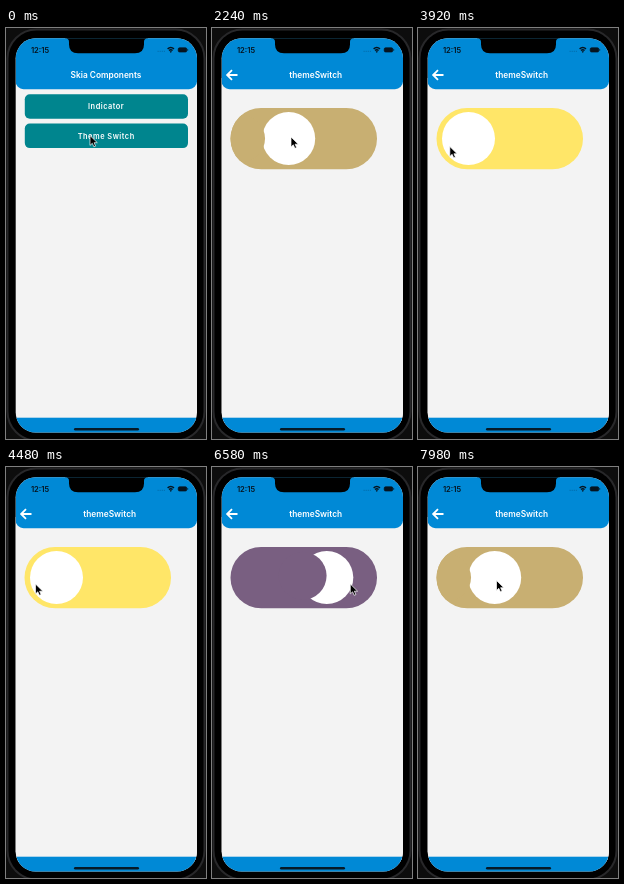
Recreate the animation shown at these times as an HTML page. Size 200 by 411 pixels, loop 8000 ms.

```html
<!DOCTYPE html>
<html lang="en">
<head>
<meta charset="utf-8">
<title>Theme switch</title>
<style>
  html, body { margin: 0; width: 100%; height: 100%; overflow: hidden; background: #0d0d0d; }
  svg { display: block; width: 100vw; height: 100vh; }
  text { font-family: Inter, "Liberation Sans", sans-serif; font-weight: 600; text-anchor: middle; fill: #fff; }
  .title { font-size: 8.35px; }
  .label { font-size: 7.4px; letter-spacing: .5px; }
  .clock { font-size: 7.6px; fill: #06141f; }
  .blue { fill: #0089d6; }
  .paper { fill: #f3f3f3; }
  .button { fill: #00858e; }
</style>
</head>
<body>
<svg viewBox="0 0 200 411">
  <defs>
    <clipPath id="screen"><rect x="9.7" y="10.3" width="181.3" height="394.3" rx="20"/></clipPath>
    <clipPath id="pillShape"><rect x="18.5" y="80" width="146.5" height="61.3" rx="30.6"/></clipPath>
  </defs>

  <rect x="1.5" y="1.5" width="197" height="411" rx="29" fill="#000" stroke="#28282a" stroke-width="2"/>

  <g clip-path="url(#screen)">
    <rect class="paper" width="200" height="411"/>

    <g id="home">
      <rect class="button" x="18.8" y="66.2" width="163.2" height="24.5" rx="5"/>
      <rect class="button" x="18.8" y="95.6" width="163.2" height="24.5" rx="5"/>
      <text class="label" x="100.2" y="81.1">Indicator</text>
      <text class="label" x="100.2" y="110.5">Theme Switch</text>
    </g>

    <g id="detail">
      <rect class="paper" x="9" y="50" width="183" height="345"/>
      <g clip-path="url(#pillShape)">
        <rect id="pill" x="18" y="79" width="148" height="63"/>
        <circle id="ball" cy="110.6" r="26.5" fill="#fff"/>
        <circle id="bite" r="24"/>
      </g>
    </g>

    <rect class="blue" x="9.5" y="0" width="181.5" height="61.2" rx="8"/>
    <rect class="blue" x="9" y="389.7" width="183" height="16"/>

    <text class="title" id="homeTitle" x="100" y="49.8">Skia Components</text>
    <g id="detailTitle">
      <text class="title" x="103.7" y="49.8">themeSwitch</text>
      <path d="M25.5 47H15.3M20 42.1L15.1 47L20 51.9" fill="none" stroke="#fff" stroke-width="1.8"/>
    </g>

    <text class="clock" x="34" y="24.8">12:15</text>
    <path d="M151.5 23.4H159" stroke="#0072b4" stroke-width="1.2" stroke-dasharray="1.2 .9"/>
    <g fill="none" stroke="#06141f">
      <path d="M161.6 20.9Q164.8 18.1 168 20.9M163 22.5Q164.8 21 166.6 22.5" stroke-width="1.4"/>
      <circle cx="164.8" cy="23.8" r=".5"/>
      <rect x="172.2" y="19.7" width="8.6" height="4.4" rx="1.4" fill="#06141f" stroke-width=".6"/>
      <path d="M181.7 21.1V22.7" stroke-width=".7"/>
    </g>
    <rect x="68" y="400" width="65" height="2.4" rx="1.2" fill="#061a28"/>
    <path d="M59 9V10.3Q63 10.3 63 14V16.4Q63 25.2 72 25.2H129Q138 25.2 138 16.4V14Q138 10.3 142 10.3V9Z"/>
  </g>

  <path id="cursor" d="M0 0V9.9L2.3 7.8L3.9 11.3L5.6 10.6L4.1 7.2H7.3Z" fill="#000" stroke="#fff" stroke-width=".7"/>
</svg>

<script>
  const LOOP = 8000, TICK = 140;
  const LEFT = 50.5, RIGHT = 134;
  const YELLOW = [255, 230, 104], PURPLE = [81, 55, 136];

  // [time, x, y]
  const pointer = [
    [0, 84, 107.5], [1260, 84, 107.5], [1680, 54, 110], [1960, 54, 110],
    [2240, 79, 109], [2940, 158, 116], [3080, 155, 116.5], [3300, 155, 116.5],
    [4060, 4, 119], [4480, 29.5, 117], [5460, 128, 113.5], [6020, 155, 116],
    [6400, 155, 116], [6580, 138.3, 117], [7140, 53, 116], [7420, 53, 115],
    [7980, 78.5, 113.5]
  ];
  // [time, x]
  const drag = [
    [0, LEFT], [1960, LEFT], [2240, 76.7], [2840, RIGHT], [3300, RIGHT],
    [3920, LEFT], [5040, LEFT], [5460, 91], [6020, 131], [6400, 131],
    [6580, 114.8], [7100, LEFT], [7420, LEFT], [7980, 76.7]
  ];

  const $ = id => document.getElementById(id);
  const set = (id, attrs) => {
    for (const key in attrs) $(id).setAttribute(key, attrs[key]);
  };
  const mix = (a, b, k) => a + (b - a) * k;
  const clamp = v => Math.min(1, Math.max(0, v));

  function at(keys, t, col) {
    const i = keys.findIndex(k => k[0] > t);
    if (i < 0) return keys[keys.length - 1][col];
    const a = keys[i - 1], b = keys[i];
    return mix(a[col], b[col], (t - a[0]) / (b[0] - a[0]));
  }

  function draw(t) {
    const push = 1 - (1 - clamp((t - 640) / 620)) ** 3;
    set('home', { transform: `translate(${-55 * push} 0)`, visibility: push < 1 ? 'visible' : 'hidden' });
    set('detail', { transform: `translate(${182 * (1 - push)} 0)` });
    set('homeTitle', { opacity: clamp(1 - push * 1.5), transform: `translate(${-60 * push} 0)` });
    set('detailTitle', { opacity: push, transform: `translate(${60 * (1 - push)} 0)` });

    const x = at(drag, t, 1);
    const p = (x - LEFT) / (RIGHT - LEFT);
    const fill = `rgb(${YELLOW.map((c, i) => Math.round(mix(c, PURPLE[i], p)))})`;
    set('pill', { fill });
    set('ball', { cx: x });
    set('bite', { fill, cx: mix(-13.3, 121.6, p), cy: 110.6 - 12 * Math.max(0, p - 0.62) });
    set('cursor', { transform: `translate(${at(pointer, t, 1)} ${at(pointer, t, 2)})` });
  }

  const start = performance.now();
  function frame() {
    const t = (performance.now() - start) % LOOP;
    draw(t < 700 ? 0 : Math.floor(t / TICK) * TICK);
    requestAnimationFrame(frame);
  }
  frame();
</script>
</body>
</html>
```
